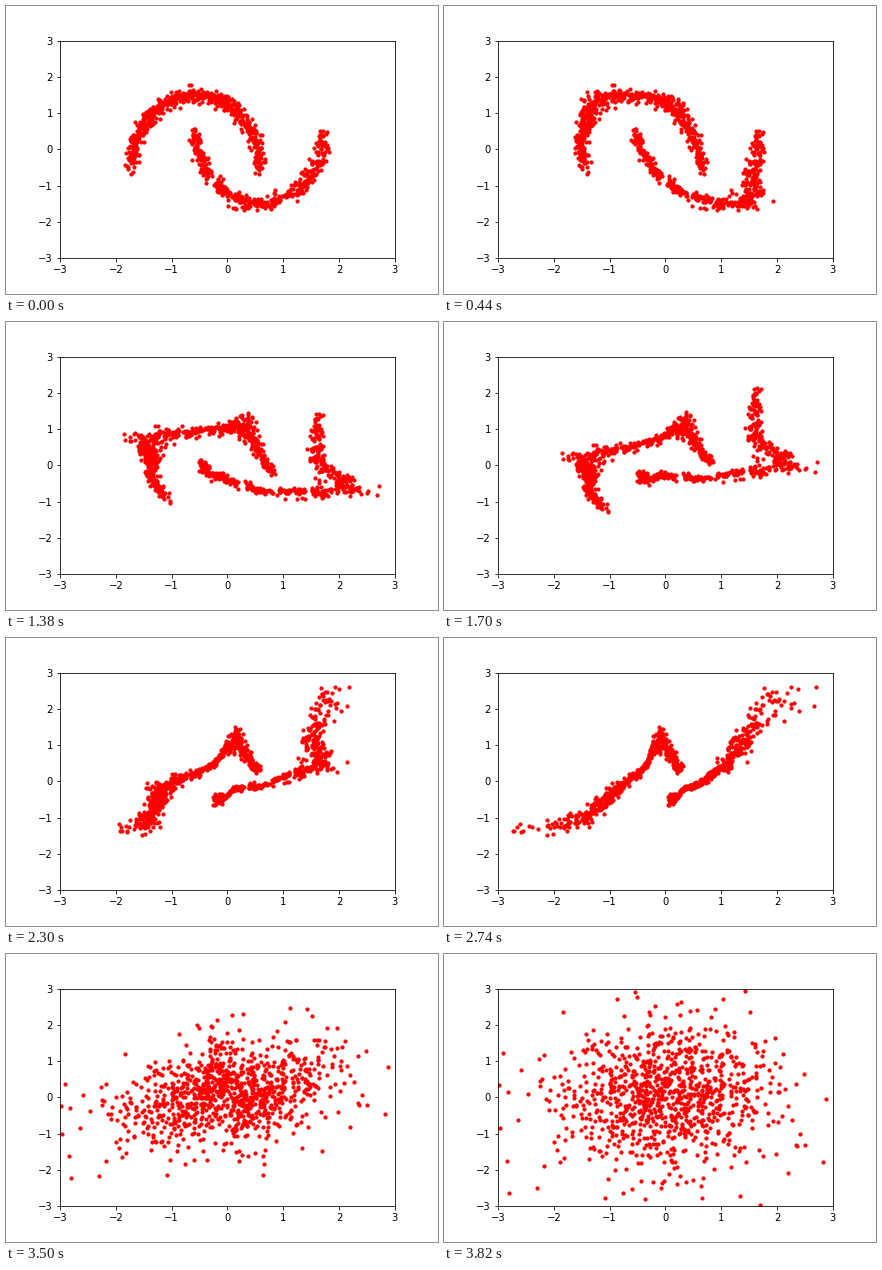
Animation, 432 px wide and 288 px high, one loop 3840 ms. Source, as a matplotlib script:

```python
import numpy as np
import matplotlib.pyplot as plt
from matplotlib.animation import FuncAnimation

STEPS = 48       # frames per coupling layer
INTERVAL = 20    # ms
N = 1000
SPLIT = 0.55     # share of points on the upper moon

rng = np.random.default_rng(11)


def moons(u, nx, ny):
    """Two interleaved half circles; u runs along the upper, then the lower."""
    upper = u < SPLIT
    a = np.pi * np.where(upper, u / SPLIT, (u - SPLIT) / (1 - SPLIT))
    x = np.where(upper, -0.5 - np.cos(a), 0.5 - np.cos(a)) / 0.87
    y = np.where(upper, 2 * np.sin(a) - 0.5, 0.5 - 2 * np.sin(a))
    return x + 0.058 * nx, y + 0.1 * ny


def bend_x(x, y):
    """Stretch rows far from the middle and push low ones to the right."""
    y = np.clip(y, -1.65, 1.65)
    scale = 0.86 + 0.1 * y + 0.18 * y**4
    shift = 0.14 - 0.24 * y + 0.21 * y**2
    return scale * x + shift


def bend_y(x, y):
    """Lower the left side and lift the right one."""
    # x, scale, shift
    keys = np.array([(-1.5, 0.69, -1.13), (-0.5, 0.77, -0.84),
                     (-0.1, 0.44, -0.06), (0.4, 0.72, 0.55),
                     (0.8, 0.52, 0.58), (1.6, 1.17, 2.0),
                     (2.3, 1.20, 2.25)])
    at, scale, shift = keys.T
    return np.interp(x, at, scale) * y + np.interp(x, at, shift)


def spread(order):
    """Normal values handed out in the given order."""
    out = np.empty(N)
    out[np.argsort(order)] = np.sort(rng.normal(size=N))
    return out


u = rng.random(N)
nx, ny = rng.normal(size=(2, N))

x0, y0 = moons(u, nx, ny)
x1 = bend_x(x0, y0)
y1 = bend_y(x1, y0)
x2 = spread(u + 0.018 * nx)
y2 = ny

# each layer moves one coordinate only
stages = [np.c_[p] for p in
          ((x0, y0), (x1, y0), (x1, y1), (x2, y1), (x2, y2))]

fig, ax = plt.subplots(figsize=(6, 4), dpi=72)
fig.subplots_adjust(bottom=0.125)
ax.set_xlim(-3, 3)
ax.set_ylim(-3, 3)
dots = ax.scatter(x0, y0, s=10, color="red")


def update(i):
    layer, step = divmod(i, STEPS)
    t = step / STEPS
    dots.set_offsets((1 - t) * stages[layer] + t * stages[layer + 1])
    return (dots,)


anim = FuncAnimation(fig, update, frames=STEPS * (len(stages) - 1),
                     interval=INTERVAL, repeat=True, repeat_delay=0)
plt.show()
```
